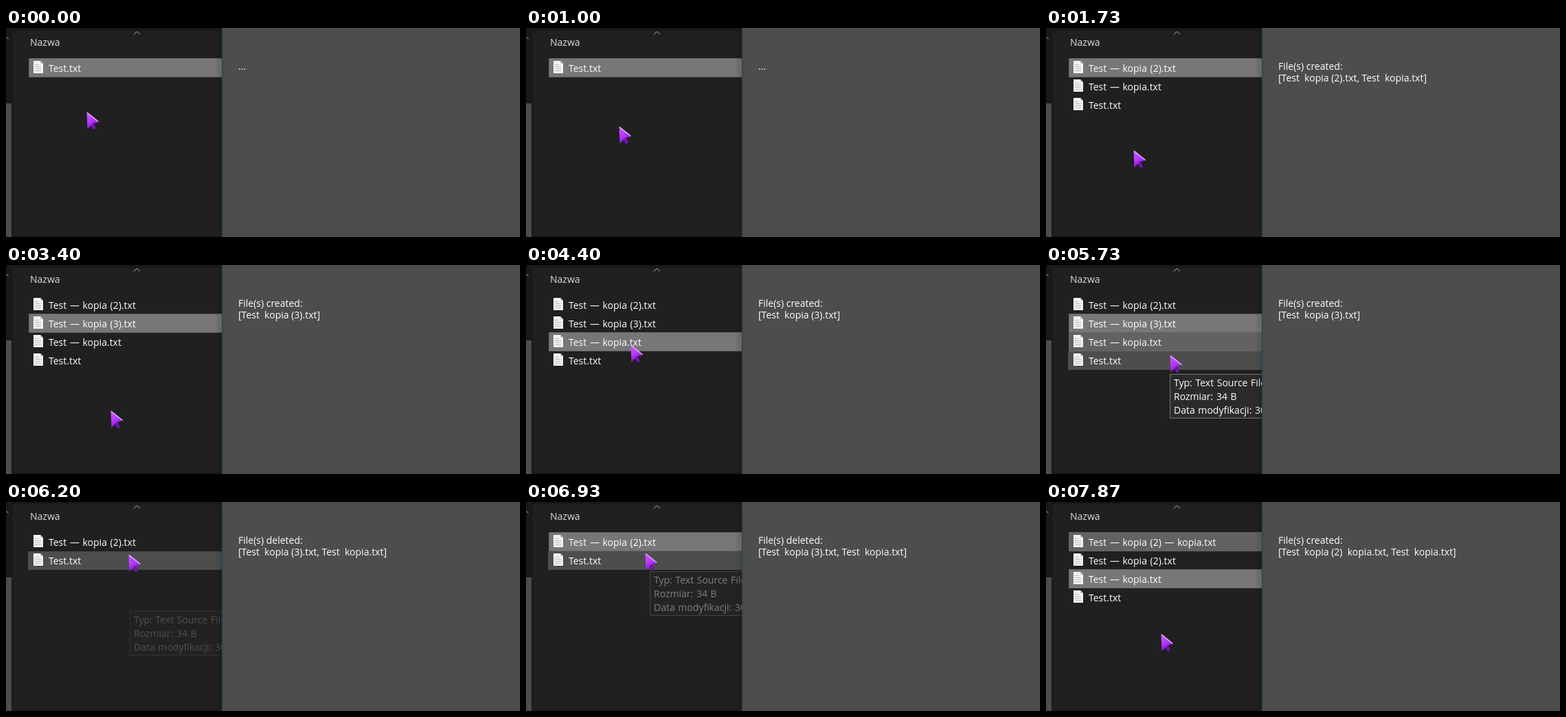
An HTML page with a canvas that plays this animation: 748x305 px, repeating every 8 s.

```html
<!DOCTYPE html>
<html lang="pl">
<head>
<meta charset="utf-8">
<title>File watcher</title>
<style>
  html, body { margin: 0; width: 100%; height: 100%; overflow: hidden; background: #202020; }
  canvas { display: block; }
</style>
</head>
<body>
<canvas id="stage" width="748" height="305"></canvas>
<script>
const ctx = document.getElementById('stage').getContext('2d');
const LOOP = 8000, TICK = 200 / 3, EDGE = 314, ROW = 27, TOP = 44;
const FONT = '14px "Open Sans", "Noto Sans", sans-serif';

const A = 'Test.txt', B = 'Test — kopia.txt', C = 'Test — kopia (2).txt',
      D = 'Test — kopia (3).txt', E = 'Test — kopia (2) — kopia.txt';

// What the user does in the folder
const actions = [
  [-Infinity, 'paste', A],
  [1400, 'paste', B],
  [1670, 'paste', C],
  [2530, 'paste', D],
  [4400, 'click', B],
  [4870, 'extend', D],
  [5800, 'delete'],
  [6930, 'click', C],
  [7070, 'extend', A],
  [7800, 'paste', E, B]
];

// Pointer moves: start, end, x, y
const home = [117, 122];
const moves = [
  [270, 400, 128, 141], [930, 1070, 141, 145], [1200, 1470, 127, 178],
  [2670, 2930, 146, 215], [3000, 3130, 152, 206], [3330, 3400, 152, 212],
  [3670, 4470, 152, 114], [4530, 4730, 154, 98], [5000, 5200, 180, 131],
  [5870, 6270, 178, 71], [6870, 7070, 157, 86], [7200, 7400, 170, 187],
  [7730, 7870, 167, 192]
];

const tips = [{ y: 159, show: 5530, hide: 5930 }, { y: 101, show: 6670, hide: 6730 }];
const FADE = 340;
const POLL = 1024, FIRST_POLL = 700;

const clamp = v => Math.max(0, Math.min(1, v));
const smooth = k => k * k * (3 - 2 * k);

function folderAt(t) {
  let files = [], picked = [];
  for (const [at, act, ...names] of actions) {
    if (at > t) break;
    if (act === 'paste') files = [...files, ...names].sort();
    if (act === 'delete') files = files.filter(f => !picked.includes(f));
    picked = act === 'extend' ? [...picked, ...names] : names;
  }
  return { files, picked };
}

// The watcher compares the folder with its previous poll
function logAt(t) {
  let log = ['...'];
  for (let p = FIRST_POLL; p <= t; p += POLL) {
    const old = folderAt(p - POLL).files, now = folderAt(p).files;
    const added = now.filter(f => !old.includes(f));
    const gone = old.filter(f => !now.includes(f));
    const show = names => '[' + names.join(', ').replace(/—/g, '') + ']';
    if (added.length) log = ['File(s) created:', show(added)];
    if (gone.length) log = ['File(s) deleted:', show(gone)];
  }
  return log;
}

function pointerAt(t) {
  let [x, y] = home;
  for (const [start, end, nx, ny] of moves) {
    const e = smooth(clamp((t - start) / (end - start)));
    x += (nx - x) * e;
    y += (ny - y) * e;
  }
  return [Math.round(x), Math.round(y)];
}

function rect(color, x, y, w, h) {
  ctx.fillStyle = color;
  ctx.fillRect(x, y, w, h);
}

function frameRect(color, x, y, w, h) {
  ctx.strokeStyle = color;
  ctx.lineWidth = 1;
  ctx.strokeRect(x + .5, y + .5, w - 1, h - 1);
}

function poly(points, fill) {
  ctx.beginPath();
  points.forEach(([x, y]) => ctx.lineTo(x, y));
  ctx.closePath();
  ctx.fillStyle = fill;
  ctx.fill();
}

function line(color, width, points) {
  ctx.beginPath();
  points.forEach(([x, y]) => ctx.lineTo(x, y));
  ctx.strokeStyle = color;
  ctx.lineWidth = width;
  ctx.stroke();
}

function text(str, x, y, color = '#ffffff', gap = '1px') {
  ctx.font = FONT;
  ctx.wordSpacing = gap;
  ctx.fillStyle = color;
  ctx.fillText(str, x, y);
}

function drawExplorer() {
  rect('#202020', 0, 0, EDGE, 305);
  rect('#191919', 0, 0, EDGE, 4);
  rect('#191919', 0, 0, 10, 305);
  rect('#4d4d4d', 0, 110, 8, 195);
  line('#a8a8a8', 1, [[0, 13], [3.5, 16.5]]);
  line('#b4b4b4', 1, [[186, 9.5], [190.5, 5], [195, 9.5]]);
  text('Nazwa', 35, 26, '#dedede');
}

function drawIcon(x, y) {
  poly([[x, y], [x + 10, y], [x + 14, y + 4], [x + 14, y + 18], [x, y + 18]], '#f2f2f2');
  poly([[x + 10, y], [x + 10, y + 4], [x + 14, y + 4]], '#c4c4c4');
  for (let i = 0; i < 4; i++) rect('#bcbcbc', x + 2, y + 5 + i * 3, i ? 9 : 6, 1);
}

function drawRow(name, i, picked, hot) {
  const y = TOP + i * ROW;
  if (picked.includes(name)) {
    const focused = name === picked[picked.length - 1];
    rect(focused ? '#777777' : '#626262', 33, y, EDGE - 33, ROW + 1);
    frameRect('#646464', 33, y, EDGE - 32, ROW + 1);
  } else if (hot) {
    rect('#4d4d4d', 32, y + 1, EDGE - 32, ROW);
  }
  drawIcon(40, y + 4);
  text(name, 62, y + 20);
}

function drawTip({ y, show, hide }, t) {
  const alpha = clamp((t - show) / FADE * 2) * clamp((hide + FADE - t) / FADE);
  if (!alpha) return;
  ctx.globalAlpha = alpha;
  rect('#2b2b2b', 180, y, 160, 65);
  frameRect('#767676', 180, y, 160, 65);
  ['Typ: Text Source File', 'Rozmiar: 34 B', 'Data modyfikacji: 30'].forEach((s, i) =>
    text(s, 186, y + 18 + i * 20));
  ctx.globalAlpha = 1;
}

function drawShade() {
  const g = ctx.createLinearGradient(303, 0, EDGE, 0);
  g.addColorStop(0, 'rgba(0,0,0,0)');
  g.addColorStop(1, 'rgba(0,0,0,.14)');
  rect(g, 303, 4, EDGE - 303, 301);
  rect('rgba(0,0,0,.15)', 10, 303, EDGE - 10, 2);
}

function drawLog(t) {
  rect('#4d4d4d', 316, 0, 432, 305);
  rect('#284a5e', EDGE, 0, 1, 305);
  rect('#36464f', EDGE + 1, 0, 1, 305);
  logAt(t).forEach((s, i) => text(s, 338, 61 + i * 17, '#ffffff', '0px'));
}

function drawPointer(x, y) {
  ctx.save();
  ctx.translate(x, y);
  const g = ctx.createLinearGradient(2, 4, 11, 22);
  g.addColorStop(0, '#c850ff');
  g.addColorStop(.55, '#b23af8');
  g.addColorStop(1, '#8a14d8');
  poly([[5, 18], [10, 15], [14, 24.5], [10.5, 26.5]], '#7410b8');
  poly([[.5, .5], [18.5, 15], [10, 17], [1.5, 25.5]], g);
  line('#8a20cc', 1, [[1.5, 24.5], [9.8, 16.8], [17.5, 15]]);
  line('#deb0ff', 1.5, [[1.2, 1.6], [17.2, 14.5]]);
  ctx.restore();
}

function draw(t) {
  const [x, y] = pointerAt(t);
  const { files, picked } = folderAt(t);
  const hot = Math.floor((y - TOP - 1) / ROW);
  drawExplorer();
  files.forEach((name, i) => drawRow(name, i, picked, i === hot));
  tips.forEach(tip => drawTip(tip, t));
  drawShade();
  drawLog(t);
  drawPointer(x, y);
}

function frame() {
  const t = performance.now() % LOOP;
  const tick = Math.floor((t + 7) / TICK) % (LOOP / TICK);
  draw(Math.round(tick * TICK / 10) * 10);
  requestAnimationFrame(frame);
}
draw(0);
requestAnimationFrame(frame);
</script>
</body>
</html>
```
